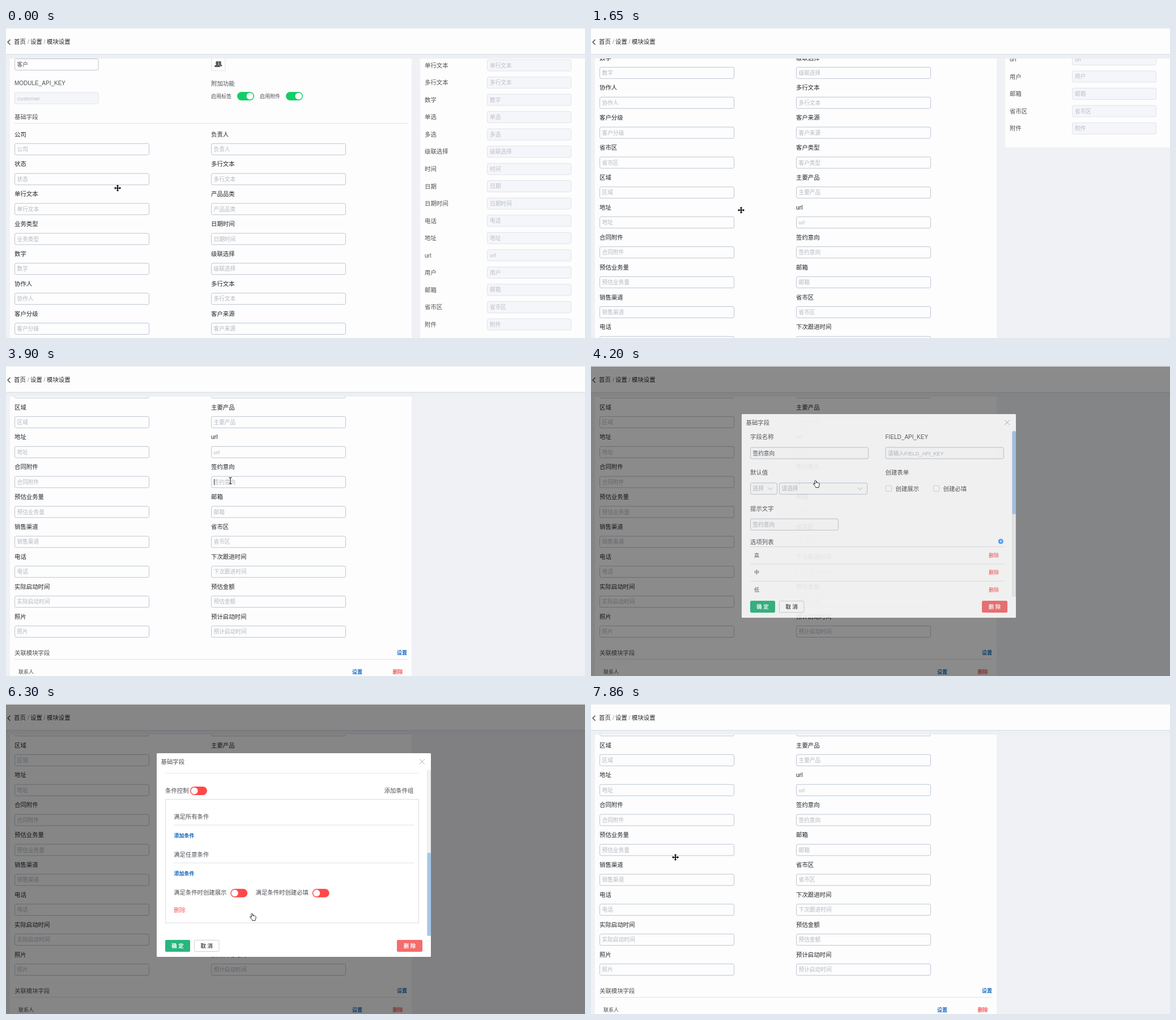
Animation, 1022 px wide and 548 px high, one loop 8000 ms. Source, as an HTML page:

```html
<!DOCTYPE html>
<html lang="zh-CN">
<head>
<meta charset="utf-8">
<title>模块设置</title>
<style>
html, body { margin: 0; width: 100%; height: 100%; overflow: hidden; background: #fff; }
svg { display: block; width: 100vw; height: 100vh; }
text { font-family: 'Liberation Sans', 'Noto Sans CJK SC', 'Noto Sans CJK', sans-serif; white-space: pre; }
</style>
</head>
<body>
<svg id="stage" viewBox="0 0 1022 548" xmlns="http://www.w3.org/2000/svg"></svg>
<script>
const NS = 'http://www.w3.org/2000/svg';
const stage = document.getElementById('stage');
const DARK = '#222428', GRAY = '#4c4f54', HINT = '#b4b8c0', EDGE = '#bcc6d3';
const BLUE = '#1266bd', RED = '#f25c5c', LINE = '#dfe1e5', PAPER = '#fdfdfd';

function el(parent, tag, attrs = {}) {
  const node = document.createElementNS(NS, tag);
  for (const k in attrs) node.setAttribute(k, attrs[k]);
  parent.appendChild(node);
  return node;
}
const group = (parent, attrs) => el(parent, 'g', attrs);
const rect = (p, x, y, width, height, fill, more) =>
  el(p, 'rect', { x, y, width, height, fill, ...more });
const path = (p, d, stroke, more) =>
  el(p, 'path', { d, fill: 'none', stroke, ...more });
const rule = (p, x1, x2, y, color = LINE) =>
  path(p, `M${x1} ${y}H${x2}`, color);

// y is the vertical middle of the line
function text(p, str, x, y, size = 10.4, fill = DARK, more) {
  const node = el(p, 'text', { x, y: y + size * 0.37, 'font-size': size, fill, ...more });
  node.textContent = str;
  return node;
}
const bold = (p, str, x, y, fill, size = 9) =>
  text(p, str, x, y, size, fill, { 'font-weight': 700 });

function input(p, x, y, w, hint, { fill = PAPER, edge = EDGE, color = HINT, pad = 4.5 } = {}) {
  rect(p, x + 0.5, y - 10, w - 1, 20, fill, { rx: 2.6, stroke: edge });
  return text(p, hint, x + pad, y, 9.7, color);
}
const disabled = { fill: '#f5f6fa', edge: '#e0e3ea', color: '#babec8', pad: 5 };

function toggle(p, x, y, on) {
  rect(p, x, y - 7.5, 30, 15, on ? '#13ce66' : '#ff4949', { rx: 7.5 });
  el(p, 'circle', { cx: on ? x + 22.5 : x + 7.5, cy: y, r: 6, fill: '#fff' });
}

function clip(id, x, y, width, height) {
  rect(el(stage, 'clipPath', { id }), x, y, width, height, '#000');
  return `url(#${id})`;
}

// Page
rect(stage, 0, 0, 1022, 548, '#f0f1f4');
const view = group(stage, { 'clip-path': clip('page', 0, 54, 1022, 494) });
const page = group(view);
rect(page, 7, 0, 709, 1200, PAPER);
rect(page, 731, 0, 291, 557.5, PAPER);

input(page, 15, 64.5, 148.5, '客户', { color: '#4a4d52' });
text(page, 'MODULE_API_KEY', 15, 97, 10, GRAY);
input(page, 15, 124, 148.5, 'customer', disabled);
rect(page, 362.5, 53.5, 24.5, 22, 'none', { stroke: '#cfd2d8', 'stroke-dasharray': '2 1.5' });
el(page, 'path', {
  fill: '#55585d',
  d: 'M377 58.5a2.6 3 0 0 1 1.6 5.6q3 .8 3 3.4h-3.4q-.6-1.8-2.6-2.6 1.2-2.6-.4-5.6z'
});
el(page, 'path', {
  fill: '#55585d',
  d: 'M372.8 58.5a2.7 3.2 0 0 1 1.4 5.9q3.8 1 3.8 4.6h-10q0-3.6 3.4-4.6a2.7 3.2 0 0 1 1.4-5.9z'
});
text(page, '附加功能', 362, 98, 10.4, GRAY);
text(page, '启用标签', 362, 120.5, 9, GRAY);
toggle(page, 408, 120.5, true);
text(page, '启用附件', 448, 120.5, 9, GRAY);
toggle(page, 494, 120.5, true);
text(page, '基础字段', 15, 157, 10.4, GRAY);
rule(page, 15, 709, 168.5);

const columns = [
  [15, '公司 状态 单行文本 业务类型 数字 协作人 客户分级 省市区 区域 地址 合同附件 预估业务量 销售渠道 电话 实际启动时间 照片'],
  [362, '负责人 多行文本 产品品类 日期时间 级联选择 多行文本 客户来源 客户类型 主要产品 url 签约意向 邮箱 省市区 下次跟进时间 预估金额 预计启动时间']
];
for (const [x, names] of columns) {
  names.split(' ').forEach((name, i) => {
    const y = 187.7 + 52.88 * i;
    text(page, name, x, y);
    input(page, x, y + 26.6, 238, name);
  });
}
const caret = path(page, 'M367.5 738V748.5', '#333');

'单行文本 多行文本 数字 单选 多选 级联选择 时间 日期 日期时间 电话 地址 url 用户 邮箱 省市区 附件'
  .split(' ').forEach((name, i) => {
    const y = 66 + 30.53 * i;
    text(page, name, 739, y, 10.4, GRAY);
    input(page, 849, y, 149, name, disabled);
  });

text(page, '关联模块字段', 15, 1045, 10.4, GRAY);
bold(page, '设置', 690, 1045, BLUE);
rule(page, 15, 708, 1056.5);
text(page, '联系人', 22, 1078.5, 9, GRAY);
bold(page, '设置', 611, 1079, BLUE);
bold(page, '删除', 682.5, 1079, RED);

// Header
rect(stage, 0, 0, 1022, 46, PAPER);
rule(stage, 0, 1022, 0.5, '#e6e8ea');
rule(stage, 0, 1022, 46.5, '#d9dde2');
rect(stage, 0, 47, 1022, 7, '#eceff3');
path(stage, 'M7.5 20.5L3 25L7.5 29.5', '#333', { 'stroke-width': 1.2 });
text(stage, '首页', 14, 24);
text(stage, '/', 38, 24, 10.4, '#999');
text(stage, '设置', 43, 24);
text(stage, '/', 66.5, 24, 10.4, '#999');
text(stage, '模块设置', 72, 24);

const mask = rect(stage, 0, 1, 1022, 547, '#000');

// Dialog
const dialog = group(stage);
rect(dialog, 266, 87, 484, 360, '#fff', { rx: 1.5 });
text(dialog, '基础字段', 273.5, 102, 10.4, GRAY);
path(dialog, 'M730 97.5l9 9m0-9l-9 9', '#a9adb3');

const pane = group(dialog, { 'clip-path': clip('pane', 266, 117, 484, 293) });
const body = group(pane);
const hover = rect(body, 281, 352, 448, 30.5, '#f3f4f9');

text(body, '字段名称', 281, 127, 10.4, GRAY);
text(body, 'FIELD_API_KEY', 519.5, 127, 10, GRAY);
input(body, 281, 156, 209, '签约意向', { color: '#4a4d52' });
const keyHint = input(body, 519.5, 156, 209.5, '请输入');
el(keyHint, 'tspan', { 'font-size': 9.2 }).textContent = 'FIELD_API_KEY';

text(body, '默认值', 281, 190.3, 10.4, GRAY);
input(body, 281, 218.8, 48, '选择');
input(body, 332, 218.8, 156, '请选择');
for (const x of [312.5, 470.5]) path(body, `M${x} 217l4.2 4.2l4.2-4.2`, '#b4bcc8');
text(body, '创建表单', 519.5, 190.3, 10.4, GRAY);
for (const [x, name] of [[520, '创建展示'], [604, '创建必填']]) {
  rect(body, x + 0.5, 213.5, 10, 10, '#fff', { rx: 1, stroke: '#cfd4dc' });
  text(body, name, x + 17.5, 218.8, 10.4, GRAY, { 'font-weight': 500 });
}

text(body, '提示文字', 281, 253.7, 10.4, GRAY);
input(body, 281, 282.2, 156, '签约意向');
text(body, '选项列表', 281, 313.5, 10.4, GRAY);
el(body, 'circle', { cx: 723.3, cy: 312, r: 4.5, fill: '#409eff' });
path(body, 'M721 312h4.6m-2.3-2.3v4.6', '#fff');
rule(body, 281, 729, 321.5);
['高', '中', '低'].forEach((name, i) => {
  const y = 336.3 + 30.5 * i;
  text(body, name, 288, y, 9, GRAY);
  text(body, '删除', 702, y + 0.3, 9, '#f14444', { 'font-weight': 500 });
  rule(body, 281, 729, 352 + 30.5 * i, '#e4e6ea');
});

text(body, '条件控制', 281, 443.7, 10.4, GRAY);
toggle(body, 325, 443.9, false);
text(body, '添加条件组', 667.5, 443.5, 10.4, GRAY, { 'font-weight': 500 });
rect(body, 281.5, 459, 447, 218.5, 'none', { stroke: '#d8dbe0' });
for (const [y, name] of [[489.5, '满足所有条件'], [556.5, '满足任意条件']]) {
  text(body, name, 296, y, 10.4, GRAY);
  rule(body, 296, 721, y + 15);
  bold(body, '添加条件', 296.5, y + 34, BLUE);
}
text(body, '满足条件时创建展示', 296, 624, 10.4, GRAY);
toggle(body, 396.3, 624.7, false);
text(body, '满足条件时创建必填', 440.5, 624, 10.4, GRAY);
toggle(body, 540.7, 624.7, false);
text(body, '删除', 296, 654.7, 10.4, RED);

rect(dialog, 743.8, 117.3, 5.8, 292.4, '#f1f1f2', { rx: 2.5, stroke: '#d6d8db', 'stroke-width': 0.7 });
const thumb = rect(dialog, 743.5, 117, 6.5, 147, '#a5c7e9', { rx: 2.5 });

function button(x, w, label, fill, edge, color) {
  rect(dialog, x + 0.5, 417.5, w - 1, 20, fill, { rx: 1.5, stroke: edge });
  text(dialog, label, x + w / 2, 427.3, 9.4, color, { 'font-weight': 700, 'text-anchor': 'middle' });
}
button(281, 44, '确 定', '#2ab57d', '#2ab57d', '#fff');
button(332, 44.5, '取 消', '#fff', '#cdd1d7', GRAY);
button(690, 45, '删 除', '#f46c6c', '#f46c6c', '#fff');

// Pointers, hot spot at 0,0
const pointer = group(stage);
const shapes = {
  move: 'M0-6L2.4-3.4H.8V-.8H3.4V-2.4L6 0L3.4 2.4V.8H.8V3.4H2.4L0 6L-2.4 3.4H-.8V.8H-3.4V2.4L-6 0L-3.4-2.4V-.8H-.8V-3.4H-2.4Z',
  beam: 'M-2.5-6.5Q-.6-6.5 0-5.6Q.6-6.5 2.5-6.5V-5.6Q.5-5.6 .5-4.5V3.8Q.5 5 2.5 5V5.9Q.6 5.9 0 5Q-.6 5.9-2.5 5.9V5Q-.5 5-.5 3.8V-4.5Q-.5-5.6-2.5-5.6Z',
  hand: 'M-.6-.6Q.8-1.4 1.2 .2L1.9 3.2Q3-.1 1.9 3.2Q3.2 2.4 3.8 3.5Q5.2 2.9 5.6 4Q7 3.8 7.2 5.4Q7.5 8 6 10.4V11.8H.6V10.6Q-.6 9.6-1.6 7.9L-3.2 6Q-3.6 4.6-2 4.6L-.3 5.9L-1.3 .8Q-1.4-.2-.6-.6Z',
  arrow: 'M0 0V10.6L2.4 8.4L4 12L5.8 11.2L4.2 7.7H7.6Z'
};
const pointers = {};
for (const name in shapes) {
  const isHand = name === 'hand';
  pointers[name] = el(pointer, 'path', {
    d: shapes[name], fill: isHand ? '#fff' : '#000', stroke: isHand ? '#111' : '#fff',
    'stroke-width': name === 'beam' ? 0.5 : 0.9, 'paint-order': isHand ? 'normal' : 'stroke'
  });
}

// Keys: time, then one or more values
const keys = {
  scroll: [[750, 0], [1050, 106], [1200, 106], [1650, 346.5], [1950, 346.5], [2250, 538]],
  pointer: [[0, 197, 283], [750, 265, 322], [2700, 265, 322], [3450, 407, 197], [3750, 396, 203],
    [4500, 396, 203], [5250, 434, 371], [6450, 434, 371], [7200, 833, 391], [7500, 833, 391], [7860, 149, 271]],
  fade: [[3900, 0, 0], [4050, 0.25, 0.4], [4200, 0.45, 0.88], [4350, 0.47, 1],
    [7350, 0.47, 1], [7500, 0.3, 0.7], [7650, 0.05, 0.12], [7860, 0, 0]],
  inner: [[5250, 0], [5400, 51.5], [5550, 51.5], [6000, 225], [6300, 290.5]]
};
function at(list, t) {
  const i = list.findIndex(k => k[0] > t);
  if (i < 0) return list[list.length - 1].slice(1);
  if (i === 0) return list[0].slice(1);
  const a = list[i - 1], b = list[i], f = (t - a[0]) / (b[0] - a[0]);
  return a.slice(1).map((v, n) => v + (b[n + 1] - v) * f);
}
function shapeAt(t) {
  if (t < 3750 || t >= 7860) return 'move';
  if (t < 4050) return 'beam';
  return t < 6900 ? 'hand' : 'arrow';
}
const show = (node, on) => node.setAttribute('visibility', on ? 'visible' : 'hidden');
const shift = (node, x, y) => node.setAttribute('transform', `translate(${x} ${y})`);

function draw(now) {
  const t = now >= 7860 ? 7860 : Math.min(7650, Math.floor(now / 150) * 150);
  const [dim, alpha] = at(keys.fade, t);
  const [inner] = at(keys.inner, t);
  shift(page, 0, -at(keys.scroll, t)[0]);
  show(caret, t >= 3900 && t < 4350);
  mask.setAttribute('opacity', dim);
  dialog.setAttribute('opacity', alpha);
  show(dialog, alpha > 0);
  shift(dialog, 0, -17 * (1 - alpha));
  shift(body, 0, -inner);
  shift(thumb, 0, inner * 146 / 290.5);
  hover.setAttribute('opacity', t >= 5250 && t < 5850 ? 1 : 0);
  shift(pointer, ...at(keys.pointer, t));
  const shape = shapeAt(t);
  for (const name in pointers) show(pointers[name], name === shape);
}

const start = performance.now();
function tick() {
  draw((performance.now() - start) % 8000);
  requestAnimationFrame(tick);
}
tick();
</script>
</body>
</html>
```
